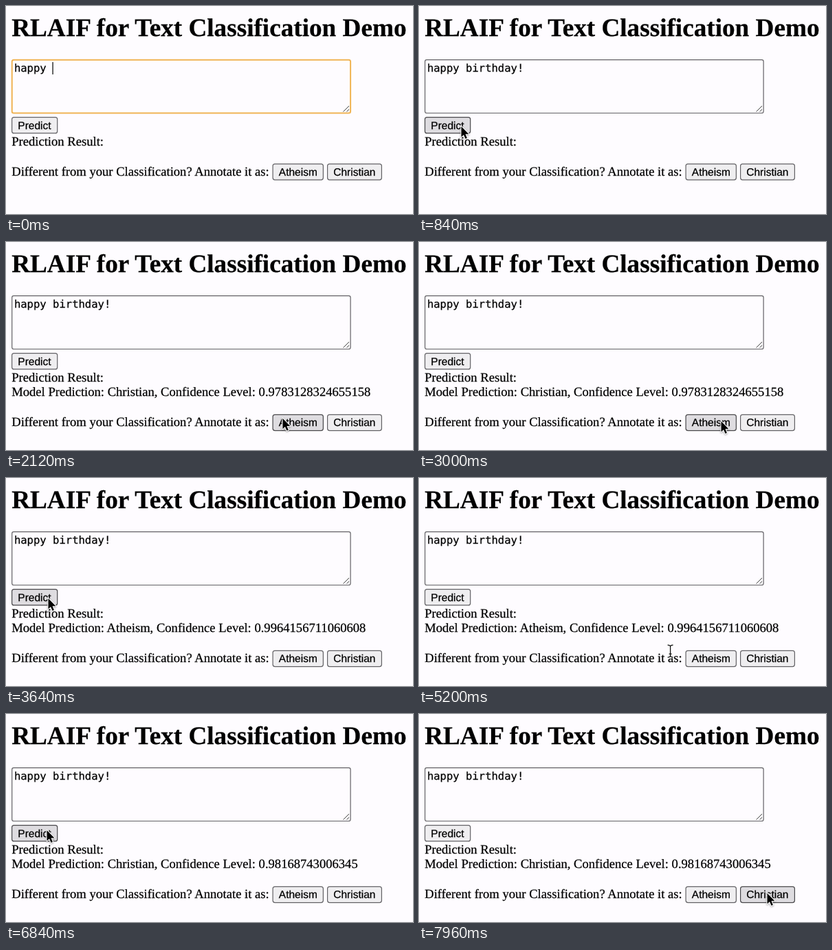
Recreate the animation shown at these times as an HTML page with a canvas. Size 592 px wide and 304 px high, loop 8000 ms.

```html
<!DOCTYPE html>
<html lang="en">
<head>
<meta charset="utf-8">
<title>Text Classification Demo</title>
<style>
  html, body { margin: 0; width: 100%; height: 100%; overflow: hidden; background: #fefcff; }
  canvas { display: block; width: 592px; height: 304px; }
</style>
</head>
<body>
<canvas id="stage"></canvas>
<script>
const W = 592, H = 304, LOOP = 8000;
const canvas = document.getElementById('stage');
const ctx = canvas.getContext('2d');
const ratio = window.devicePixelRatio || 1;
canvas.width = W * ratio;
canvas.height = H * ratio;

const PAPER = '#fefcff', BORDER = '#626165';
const SERIF = '"Liberation Serif", serif';
const FONT = {
  title: `bold 37.2px ${SERIF}`,
  body: `18.6px ${SERIF}`,
  button: '15.5px "Liberation Sans", sans-serif',
  input: '15.55px "DejaVu Sans Mono", monospace'
};

const TYPED = 'happy birthday!';
const TYPE_START = 80, KEY_MS = 46, BLUR = 840;

const RESULTS = [
  { at: 920, label: 'Christian', level: '0.9783128324655158' },
  { at: 3560, label: 'Atheism', level: '0.9964156711060608' },
  { at: 6160, label: 'Christian', level: '0.98168743006345' }
];

const spot = (x, y) => ({ x, y });
const ENTRY = spot(130, 226);
const PREDICT = spot(61, 176), PREDICT_TOP = spot(59, 170);
const ATHEISM = spot(439, 262), CHRISTIAN = spot(506, 262);
const move = (from, to, target) => ({ from, to, target });
const MOVES = [
  move(500, 840, PREDICT),
  move(1000, 1640, spot(308, 247)),
  move(1780, 2640, ATHEISM),
  move(3020, 3400, PREDICT),
  move(4260, 4640, spot(182, 258)),
  move(4780, 5200, spot(364, 253)),
  move(5200, 5520, CHRISTIAN),
  move(5680, 6160, PREDICT_TOP),
  move(7180, 7960, CHRISTIAN)
];

const ARROW = new Path2D('M0 0V15.4L3.5 12.2L6 18L8.4 17L6 11.2H10.9Z');
const easeOut = u => 1 - (1 - u) ** 2.5;

function pointerAt(t) {
  if (t < MOVES[0].from) return null;
  let { x, y } = ENTRY;
  for (const { from, to, target } of MOVES) {
    if (t < from) break;
    const s = easeOut(Math.min(1, (t - from) / (to - from)));
    x += (target.x - x) * s;
    y += (target.y - y) * s;
  }
  return { x, y };
}

// A hairline stroke gives the glyphs their slightly heavy rendering.
function text(str, x, y, font) {
  ctx.font = font;
  ctx.fillStyle = ctx.strokeStyle = '#000';
  ctx.lineWidth = .25;
  ctx.fillText(str, x, y);
  ctx.strokeText(str, x, y);
}

function line(x1, y1, x2, y2) {
  ctx.beginPath();
  ctx.moveTo(x1, y1);
  ctx.lineTo(x2, y2);
  ctx.stroke();
}

function box(x, y, w, h, radius, fill, stroke, weight) {
  ctx.beginPath();
  ctx.roundRect(x, y, w, h, radius);
  ctx.fillStyle = fill;
  ctx.fill();
  ctx.strokeStyle = stroke;
  ctx.lineWidth = weight;
  ctx.stroke();
}

const inside = (p, x, y, w, h) =>
  p && p.x >= x && p.x <= x + w && p.y >= y && p.y <= y + h;

function button(label, x, y, w, pointer) {
  const hover = inside(pointer, x, y, w, 24.5);
  box(x + .6, y + .6, w - 1.2, 23.3, 3,
    hover ? '#dedce0' : '#efeef0', hover ? '#48474a' : BORDER, 1.2);
  text(label, x + 9.3, y + 17.5, FONT.button);
}

function drawArrow() {
  ctx.lineJoin = 'round';
  ctx.strokeStyle = '#fff';
  ctx.lineWidth = 2.2;
  ctx.shadowColor = 'rgba(0,0,0,.35)';
  ctx.shadowBlur = 2.5 * ratio;
  ctx.shadowOffsetY = ratio;
  ctx.stroke(ARROW);
  ctx.shadowColor = 'transparent';
  ctx.fillStyle = '#000';
  ctx.fill(ARROW);
}

function drawBeam() {
  const end = 9, bend = 6.5;
  const beam = new Path2D();
  for (const s of [-1, 1]) {
    beam.moveTo(-4, s * end);
    beam.quadraticCurveTo(0, s * end, 0, s * bend);
    beam.quadraticCurveTo(0, s * end, 4, s * end);
  }
  beam.moveTo(0, -bend);
  beam.lineTo(0, bend);
  beam.moveTo(-2, 4);
  beam.lineTo(2, 4);
  for (const [color, weight] of [['#fff', 2.8], ['#111', 1.3]]) {
    ctx.strokeStyle = color;
    ctx.lineWidth = weight;
    ctx.stroke(beam);
  }
}

function drawPointer(p, shift) {
  const overText = inside(p, 8, 188, 134, 21) ||
    (shift && inside(p, 8, 209, 522, 21)) ||
    inside(p, 8, 231 + shift, 376, 22);
  ctx.save();
  ctx.translate(p.x + .5, p.y);
  if (overText) drawBeam(); else drawArrow();
  ctx.restore();
}

function drawInput(t) {
  const focused = t < BLUR;
  box(8.7, 78.7, 492.4, 77.8, 2.5, PAPER, focused ? '#f0b454' : BORDER, focused ? 2 : 1.2);
  const extra = t < TYPE_START ? 0 : Math.floor((t - TYPE_START) / KEY_MS) + 1;
  const typed = TYPED.slice(0, 'happy '.length + extra);
  text(typed, 11.9, 95.8, FONT.input);
  if (focused) ctx.fillRect(11.3 + ctx.measureText(typed).width, 82, 1.2, 18);
  ctx.strokeStyle = '#444';
  ctx.lineWidth = 1;
  line(490.5, 154.5, 499, 146);
  line(495.5, 154.5, 499, 151);
}

function draw(t) {
  ctx.setTransform(ratio, 0, 0, ratio, 0, 0);
  ctx.textRendering = 'geometricPrecision';
  ctx.fillStyle = PAPER;
  ctx.fillRect(0, 0, W, H);

  const pointer = pointerAt(t);
  const result = RESULTS.filter(r => r.at <= t).pop();
  const shift = result ? 21.5 : 0;

  text('RLAIF for Text Classification Demo', 8.2, 44, FONT.title);
  drawInput(t);
  button('Predict', 8, 162, 67.3, pointer);
  text('Prediction Result:', 8.2, 204, FONT.body);
  if (result) {
    text(`Model Prediction: ${result.label}, Confidence Level: ${result.level}`, 8.2, 225, FONT.body);
  }
  text('Different from your Classification? Annotate it as:', 8.2, 247.6 + shift, FONT.body);
  button('Atheism', 387.5, 230.2 + shift, 74.5, pointer);
  button('Christian', 467, 230.2 + shift, 80, pointer);
  if (pointer) drawPointer(pointer, shift);
}

const start = performance.now();
function tick() {
  draw((performance.now() - start) % LOOP);
  requestAnimationFrame(tick);
}
tick();
</script>
</body>
</html>
```
